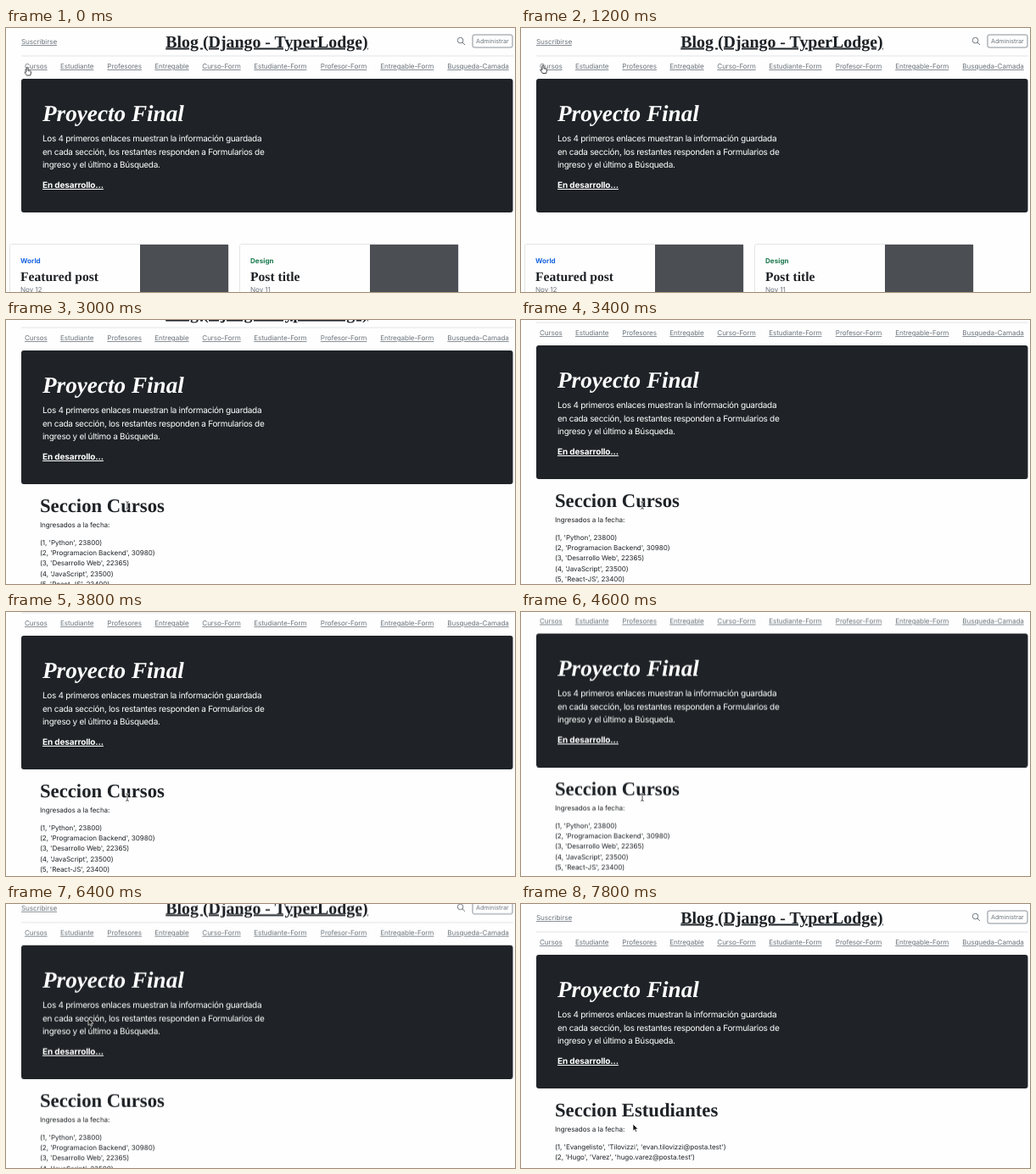
An HTML page for the animation above (8000 ms loop, 600 px wide and 312 px high).

```html
<!DOCTYPE html>
<html lang="es">
<head>
<meta charset="utf-8">
<title>Blog</title>
<style>
  html, body { margin: 0; width: 100%; height: 100%; overflow: hidden; background: #fefefe; }
  svg { display: block; width: 600px; height: 312px; }
  text {
    font: 8.1px Inter, "Open Sans", sans-serif;
    letter-spacing: -.08px;
    fill: #212529;
    text-rendering: geometricPrecision;
    white-space: pre;
  }
  .link text, text.link { fill: #6c757d; text-decoration: underline; }
  .serif { font: bold 22.7px "Liberation Serif", "Times New Roman", serif; letter-spacing: 0; fill: #1e2226; }
  .brand { font-size: 19.9px; text-decoration: underline; text-anchor: middle; }
  .hero { font-size: 27.2px; font-style: italic; fill: #fff; }
  .post { font-size: 15.6px; }
  .lead { font-size: 10px; letter-spacing: -.3px; fill: #fff; }
  .more { font-weight: bold; letter-spacing: -.13px; text-decoration: underline; }
  .btn { font-size: 7.2px; letter-spacing: -.02px; fill: #6c757d; }
  .tag { font-weight: bold; letter-spacing: 0; }
  .muted { fill: #6c757d; }
  .line { fill: none; stroke: #e3e4e6; }
  .icon { fill: none; stroke: #6c757d; }

  .anim { animation: 8s step-end infinite; }
  #page { animation-name: scroll; }
  #home { animation-name: home; }
  #courses { animation-name: courses; }
  #students { animation-name: students; }
  #pointer { animation-name: move; }
  #arrow { animation-name: arrow; }
  #hand { animation-name: hand; }
  #beam { animation-name: beam; }

  @keyframes scroll {
    0%, 32.5% { transform: translateY(0); }
    35% { transform: translateY(-12px); }
    37.5% { transform: translateY(-24px); }
    40% { transform: translateY(-27.5px); }
    42.5% { transform: translateY(-30px); }
    47.5% { transform: translateY(-32px); }
    57.5% { transform: translateY(-34.5px); animation-timing-function: steps(6); }
    72.5% { transform: translateY(-45px); animation-timing-function: steps(4); }
    82.5%, 100% { transform: translateY(0); }
  }
  @keyframes move {
    0% { transform: translate(25px, 46.5px); }
    2.5% { transform: translate(308px, 273px); }
    5% { transform: translate(308px, 273px); animation-timing-function: steps(4); }
    15% { transform: translate(26px, 44px); }
    20% { transform: translate(26px, 44px); animation-timing-function: steps(5); }
    32.5% { transform: translate(142.5px, 218px); }
    35% { transform: translate(143px, 219px); }
    57.5% { transform: translate(143px, 219px); animation-timing-function: steps(6); }
    72.5% { transform: translate(108px, 222px); }
    75% { transform: translate(108px, 222px); animation-timing-function: steps(4); }
    85% { transform: translate(86px, 48.5px); }
    92.5% { transform: translate(86px, 48.5px); animation-timing-function: steps(2); }
    97.5%, 100% { transform: translate(132px, 260px); }
  }
  @keyframes home { 0% { opacity: 1; } 17.5%, 100% { opacity: 0; } }
  @keyframes courses { 0% { opacity: 0; } 17.5% { opacity: 1; } 92.5%, 100% { opacity: 0; } }
  @keyframes students { 0% { opacity: 0; } 92.5%, 100% { opacity: 1; } }
  @keyframes hand {
    0% { opacity: 1; } 2.5% { opacity: 0; }
    15% { opacity: 1; } 22.5% { opacity: 0; }
    87.5% { opacity: 1; } 95%, 100% { opacity: 0; }
  }
  @keyframes beam {
    0% { opacity: 0; } 2.5% { opacity: 1; } 7.5% { opacity: 0; }
    35% { opacity: 1; } 77.5%, 100% { opacity: 0; }
  }
  @keyframes arrow {
    0% { opacity: 0; } 7.5% { opacity: 1; } 15% { opacity: 0; }
    22.5% { opacity: 1; } 35% { opacity: 0; }
    77.5% { opacity: 1; } 87.5% { opacity: 0; } 95%, 100% { opacity: 1; }
  }
</style>
</head>
<body>
<svg viewBox="0 0 600 312">
  <rect width="600" height="312" fill="#fefefe"/>
  <g id="page" class="anim">
    <text class="link" x="18" y="19">Suscribirse</text>
    <text class="serif brand" x="307.5" y="22.5">Blog (Django - TyperLodge)</text>
    <g class="icon">
      <circle cx="535.6" cy="14.6" r="3.3"/>
      <path d="M538 17l3 3"/>
      <rect x="550" y="8" width="47" height="15" rx="2" stroke-width=".8"/>
    </g>
    <text class="btn" x="554" y="18.2">Administrar</text>
    <path class="line" d="M18 33H598"/>

    <g class="link">
      <text x="22" y="48">Cursos</text>
      <text x="64" y="48">Estudiante</text>
      <text x="119.3" y="48">Profesores</text>
      <text x="175.3" y="48">Entregable</text>
      <text x="231.3" y="48">Curso-Form</text>
      <text x="292.3" y="48">Estudiante-Form</text>
      <text x="370.8" y="48">Profesor-Form</text>
      <text x="441.2" y="48">Entregable-Form</text>
      <text x="520.3" y="48">Busqueda-Camada</text>
    </g>

    <rect x="18" y="60" width="579.5" height="158" rx="3" fill="#1f2327"/>
    <text class="serif hero" x="43" y="109.5">Proyecto Final</text>
    <text class="lead" x="43" y="134">Los 4 primeros enlaces muestran la información guardada</text>
    <text class="lead" x="43" y="149.5">en cada sección, los restantes responden a Formularios de</text>
    <text class="lead" x="43" y="165">ingreso y el último a Búsqueda.</text>
    <text class="lead more" x="43" y="189">En desarrollo...</text>

    <g id="home" class="anim">
      <rect class="line" x="4.5" y="255.5" width="258" height="100" rx="2"/>
      <rect x="158" y="256" width="104" height="99" fill="#4b4e52"/>
      <text class="tag" x="17" y="277.7" style="fill:#1a66e0">World</text>
      <text class="serif post" x="17" y="299">Featured post</text>
      <text class="muted" x="17" y="311.7">Nov 12</text>
      <rect class="line" x="275.5" y="255.5" width="258" height="100" rx="2"/>
      <rect x="429" y="256" width="104" height="99" fill="#4b4e52"/>
      <text class="tag" x="288" y="277.7" style="fill:#1c7a4f">Design</text>
      <text class="serif post" x="288" y="299">Post title</text>
      <text class="muted" x="288" y="311.7">Nov 11</text>
    </g>

    <g id="courses" class="anim">
      <text class="serif" x="40" y="251">Seccion Cursos</text>
      <text x="40" y="269">Ingresados a la fecha:</text>
      <text x="40" y="289.6">(1, 'Python', 23800)</text>
      <text x="40" y="302">(2, 'Programacion Backend', 30980)</text>
      <text x="40" y="314.4">(3, 'Desarrollo Web', 22365)</text>
      <text x="40" y="326.8">(4, 'JavaScript', 23500)</text>
      <text x="40" y="339.2">(5, 'React-JS', 23400)</text>
      <rect y="350" width="600" height="60" fill="#f9f9f9"/>
      <path class="line" d="M0 350.5H600"/>
    </g>

    <g id="students" class="anim">
      <text class="serif" x="40" y="251">Seccion Estudiantes</text>
      <text x="40" y="269">Ingresados a la fecha:</text>
      <text x="40" y="289.6">(1, 'Evangelisto', 'Tilovizzi', 'evan.tilovizzi@posta.test')</text>
      <text x="40" y="302">(2, 'Hugo', 'Varez', 'hugo.varez@posta.test')</text>
    </g>
  </g>

  <g id="pointer" class="anim">
    <path id="arrow" class="anim" d="M0 0V8.2L1.9 6.5 3.2 9.4 4.6 8.8 3.3 6H6z" fill="#111" stroke="#fff" stroke-width=".7"/>
    <path id="hand" class="anim" d="M-1 5.5V1a1 1 0 0 1 2 0V3.8l2.6.6a1.2 1.2 0 0 1 .9 1.5L3.8 9.5H-.6L-2.8 6.2c-.5-.9.5-1.5 1.1-.9z" fill="#fff" stroke="#111" stroke-width=".8"/>
    <g id="beam" class="anim" fill="none">
      <path d="M-1.8-4.3Q0-4.3 0-3.2 0-4.3 1.8-4.3M0-3.4V3.4M-1.8 4.3Q0 4.3 0 3.2 0 4.3 1.8 4.3" stroke="#fff" stroke-width="1.6"/>
      <path d="M-1.8-4.3Q0-4.3 0-3.2 0-4.3 1.8-4.3M0-3.4V3.4M-1.8 4.3Q0 4.3 0 3.2 0 4.3 1.8 4.3" stroke="#222" stroke-width=".8"/>
    </g>
  </g>
</svg>
</body>
</html>
```
